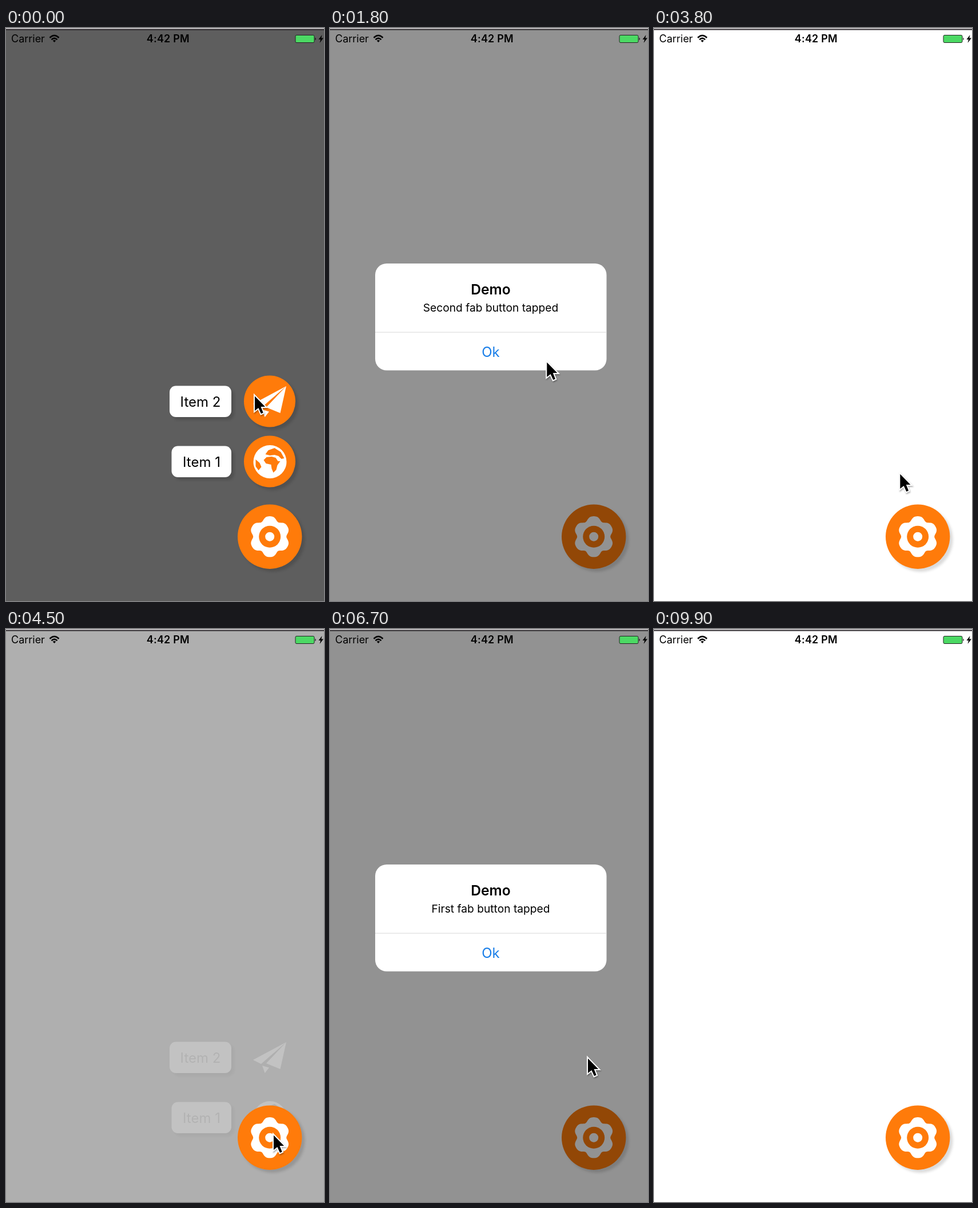
An HTML page for the animation above (10000 ms loop, 556x1000 px).

```html
<!DOCTYPE html>
<html lang="en">
<head>
<meta charset="utf-8">
<title>Floating action menu</title>
<style>
  html, body { margin: 0; width: 100%; height: 100%; overflow: hidden; background: #fff; }
  svg { display: block; width: 100vw; height: 100vh; }
  text { font-family: Inter, Roboto, sans-serif; text-anchor: middle; }
  .shadow { filter: drop-shadow(5px 5px 2px rgba(0, 0, 0, .14)); }
  .item text, #ok { font-size: 24px; }
  .disc { fill: #ff7b0a; }
</style>
</head>
<body>
<svg viewBox="0 0 556 1000">
  <rect width="556" height="1000" fill="#fff"/>
  <rect id="overlay" width="556" height="1000"/>

  <g id="items">
    <g class="item">
      <rect class="shadow" x="286" y="624.5" width="108" height="54.5" rx="11" fill="#fff"/>
      <text x="340" y="660.5">Item 2</text>
      <circle class="disc shadow" cx="461" cy="651.5" r="45"/>
      <path fill="#fff" d="M432 656L490 625L446 663ZM490 625L479.500 672L455 662ZM448 666L460 669.500L452.500 679Z"/>
    </g>
    <g class="item">
      <rect class="shadow" x="289.500" y="729.5" width="104.500" height="54.5" rx="11" fill="#fff"/>
      <text x="342" y="765.5">Item 1</text>
      <circle class="disc shadow" cx="461" cy="756.5" r="45"/>
      <path transform="translate(461.500 757)" fill="#fff" fill-rule="evenodd"
        d="M-29 0A29 29 0 0 1 29 0A29 29 0 0 1-29 0Z
          M-6-8L3-9L10-7L14-1L18-1L13 6L11 14L6 19L3 12L2 5L-7 3L-11-3Z
          M-8-13L-3-20L8-24L19-17L25-6L20-5L15-10L8-12L0-11Z
          M-25-4L-18 2L-15 9L-20 15L-25 8Z"/>
    </g>
  </g>

  <g transform="translate(461.200 887.700)">
    <circle class="disc shadow" r="56.200"/>
    <path id="gear" fill="#fff"/>
    <circle class="disc" r="19"/>
    <circle r="8" fill="#fff"/>
  </g>

  <rect id="dim" width="556" height="1000"/>

  <g id="alert">
    <rect x="79" y="411" width="404.500" height="186.500" rx="20" fill="#fff"/>
    <path d="M79 531H483.500" stroke="#d8d8d8"/>
    <text x="281" y="464.800" font-size="24.600" font-weight="600">Demo</text>
    <text id="message" x="281" y="495" font-size="19.200"></text>
    <text id="ok" x="281" y="573.500">Ok</text>
  </g>

  <g id="status">
    <rect width="556" height="2" fill="#b8b5b8"/>
    <rect y="2" width="556" height="1.500" fill="#181418"/>
    <text x="9" y="25.200" font-size="18" style="text-anchor:start">Carrier</text>
    <text x="283.300" y="25.200" font-size="18" font-weight="600" letter-spacing=".2">4:42 PM</text>
    <g fill="none" stroke="#000" stroke-width="2.500">
      <path d="M76.500 17Q84.500 9 92.500 17M79.500 20.300Q84.500 15.500 89.500 20.300"/>
      <path d="M81.800 22Q84.500 20 87.200 22L84.500 25Z" fill="#000" stroke="none"/>
    </g>
    <rect x="506" y="12.500" width="33" height="13" rx="2" fill="#4cd964" stroke="#222"/>
    <path d="M540.500 16.500Q543 19 540.500 21.500Z"/>
    <path d="M552.500 12L546.500 20H550L548.500 26L555 17.500H551.300Z"/>
  </g>

  <path id="cursor" d="M0 0V30L7 24.500L11.500 34.500L17 32L13 22H21.500Z"
    stroke="#fff" stroke-width="2" style="filter:drop-shadow(1px 2px 1px rgba(0,0,0,.3))"/>
</svg>
<script>
const LOOP = 10000, STEP = 100;
const FIRST_TAP = 0, REOPEN = 4250, SECOND_TAP = 5600;
const $ = id => document.getElementById(id);
const all = selector => document.querySelectorAll(selector);
const set = (el, attributes) => {
  for (const name in attributes) el.setAttribute(name, attributes[name]);
};

// Eased progress from 0 to 1, beginning at `start`.
function ramp(t, start, length) {
  const u = Math.min(1, Math.max(0, (t - start) / length));
  return u * u * (3 - 2 * u);
}

const moves = [
  { start: 1200, length: 1000, x: 348, y: 549 },
  { start: 3300, length: 800, x: 467, y: 881 },
  { start: 4900, length: 600, x: 450, y: 747 },
  { start: 6800, length: 1300, x: 357, y: 543 },
  { start: 9300, length: 500, x: 580, y: 620 }
];

function cursorAt(t) {
  return moves.reduce((from, move) => {
    const p = ramp(t, move.start, move.length);
    return { x: from.x + (move.x - from.x) * p, y: from.y + (move.y - from.y) * p };
  }, { x: 434, y: 640 });
}

function gearPath() {
  const points = Array.from({ length: 120 }, (_, i) => {
    const a = i * Math.PI / 60;
    const r = 33 + 3.3 * Math.cos(6 * a) - .7 * Math.cos(12 * a);
    return `${(r * Math.sin(a)).toFixed(2)} ${(-r * Math.cos(a)).toFixed(2)}`;
  });
  return `M${points.join('L')}Z`;
}

function renderMenu(t, tap) {
  const entering = t >= REOPEN && t < SECOND_TAP;
  const open = entering ? ramp(t, REOPEN, 500) : 1 - ramp(t, tap + 400, 420);
  const fade = entering ? open ** 2 : open ** .25;
  const distance = entering ? 192 : 56;

  set($('overlay'), { opacity: .631 * open });
  set($('items'), { opacity: fade, transform: `translate(0 ${distance * (1 - open)})` });
  all('.item text').forEach(el => set(el, { opacity: Math.min(open, fade) }));
  all('.item .disc').forEach(el => set(el, { opacity: Math.max(0, 2 * open - 1) }));
}

// The alert shrinks into place but only fades when it leaves.
function renderAlert(t, tap) {
  const entered = ramp(t, tap + 500, 420);
  const shown = entered - ramp(t, tap ? 9000 : 2400, 345);
  const scale = 1.2 - .2 * entered;

  set($('dim'), { opacity: .427 * shown });
  set($('alert'), {
    opacity: shown,
    transform: `translate(281.2 504.2) scale(${scale}) translate(-281.2 -504.2)`
  });
  set($('ok'), { fill: entered < 1 ? '#8c8c8c' : '#197ee8' });
  $('message').textContent = `${tap ? 'First' : 'Second'} fab button tapped`;
}

function render(t) {
  const tap = t < SECOND_TAP ? FIRST_TAP : SECOND_TAP;
  const { x, y } = cursorAt(t);
  renderMenu(t, tap);
  renderAlert(t, tap);
  set($('cursor'), { transform: `translate(${x} ${y})` });
}

set($('gear'), { d: gearPath() });
const start = performance.now();
function tick() {
  const t = (performance.now() - start) % LOOP;
  render(Math.floor(t / STEP) * STEP);
  requestAnimationFrame(tick);
}
tick();
</script>
</body>
</html>
```
